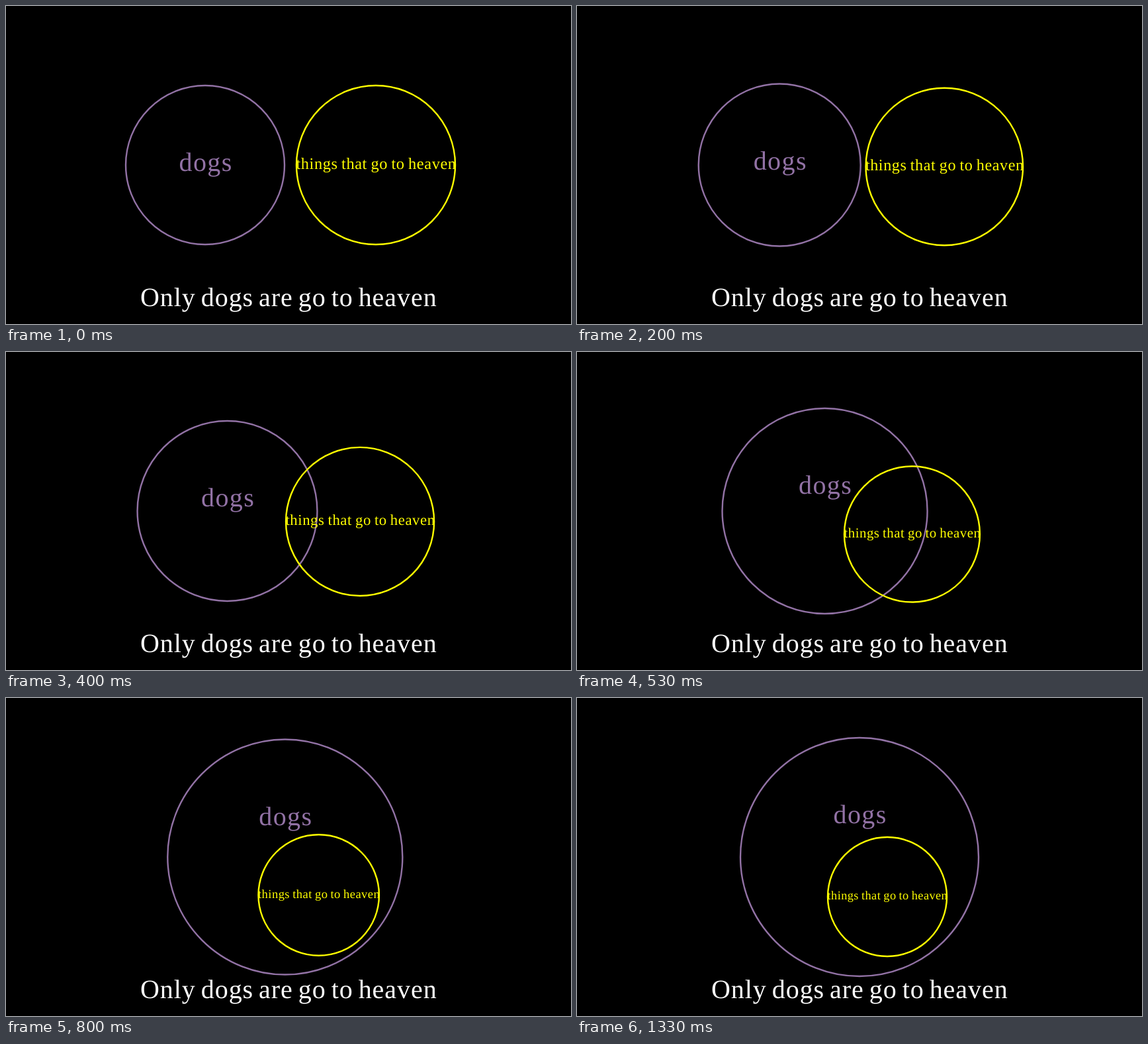
An HTML page that plays this animation: 854x480 px, repeating every 2990 ms.

```html
<!DOCTYPE html>
<html lang="en">
<head>
<meta charset="utf-8">
<title>Venn diagram</title>
<style>
  html, body { margin: 0; width: 100%; height: 100%; overflow: hidden; background: #000; }
  svg { display: block; width: 100%; height: 100%; }
  circle { fill: none; stroke-width: 2.4; vector-effect: non-scaling-stroke; }
  text {
    font: 40px "Liberation Serif", "Times New Roman", serif;
    letter-spacing: .024em;
    word-spacing: -.075em;
    text-anchor: middle;
    text-rendering: geometricPrecision;
  }
  #dogs circle { stroke: #9272a5; }
  #dogs text { fill: #9272a5; letter-spacing: .035em; }
  #heaven circle { stroke: #ff0; }
  #heaven text { fill: #ff0; font-size: 24.4px; word-spacing: -.05em; }
</style>
</head>
<body>
<svg viewBox="0 0 854 480">
  <g id="dogs"><circle cy="240"/><text>dogs</text></g>
  <g id="heaven"><circle r="120"/><text x=".5" y="5.8">things that go to heaven</text></g>
  <text x="427.3" y="453.2" fill="#fff">Only dogs are go to heaven</text>
</svg>
<script>
const LOOP = 2990, FPS = 15;
const [dogsCircle, dogsLabel] = document.querySelector('#dogs').children;
const heaven = document.querySelector('#heaven');

const sigmoid = x => 1 / (1 + Math.exp(-x));
const tail = sigmoid(-5);
const smooth = t => (sigmoid(10 * t - 5) - tail) / (1 - 2 * tail);
const mix = (a, b, p) => a + (b - a) * p;

function draw(now) {
  // Step at 15 fps, with step times rounded to 10 ms
  const time = Math.floor((now % LOOP) / 10) * 10;
  const step = Math.floor((time + 5) * FPS / 1000);
  const p = smooth(Math.min(step / FPS, 1));

  const x = mix(301, 427, p);
  dogsCircle.setAttribute('cx', x);
  dogsCircle.setAttribute('r', mix(120, 180, p));
  dogsLabel.setAttribute('x', x + 1.1);
  dogsLabel.setAttribute('y', mix(249.3, 189.3, p));

  heaven.setAttribute('transform',
    `translate(${mix(559, 469, p)} ${mix(240, 300, p)}) scale(${mix(1, .75, p)})`);
}

const start = performance.now();
(function tick() {
  draw(performance.now() - start);
  requestAnimationFrame(tick);
})();
</script>
</body>
</html>
```
